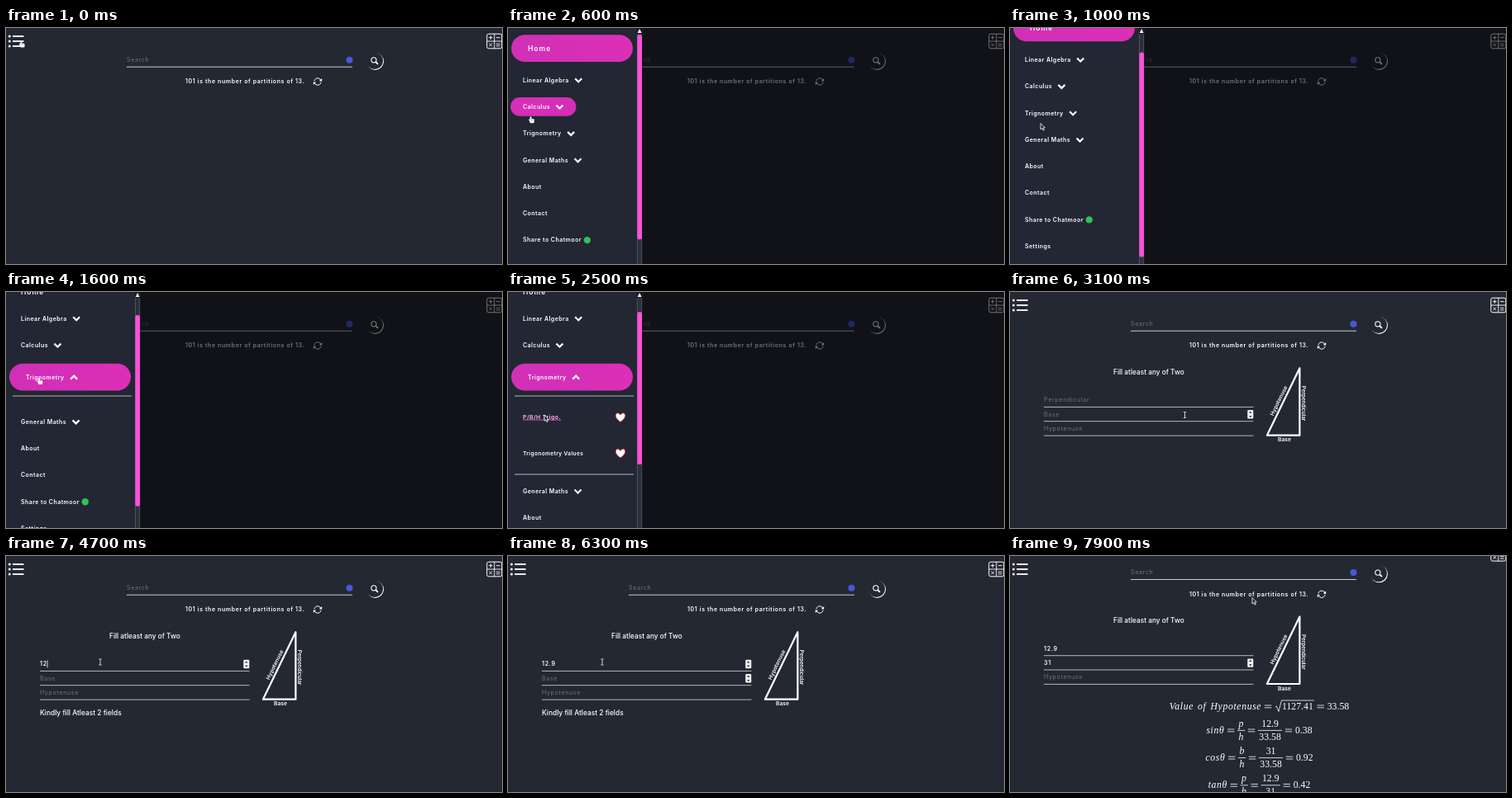
Write an HTML page with a canvas that moves like this. It is 600 by 286 pixels and loops after 8 s.

```html
<!DOCTYPE html>
<html lang="en">
<head>
<meta charset="utf-8">
<title>Maths helper</title>
<style>
  html, body { margin: 0; width: 100%; height: 100%; overflow: hidden; background: #232833; }
  canvas { display: block; width: 600px; height: 286px; }
</style>
</head>
<body>
<canvas id="stage" width="600" height="286"></canvas>
<script>
const ctx = document.getElementById('stage').getContext('2d');
const W = 600, H = 286, LOOP = 8000, STEP = 100;
const BG = '#232833', WHITE = '#fff', HINT = '#70747c', RULE = '#c6c9ce', PINK = '#d62eb7';
const SANS = 'Inter, sans-serif', SERIF = '"Liberation Serif", serif';

// ---------- helpers ----------
const ramp = (t, a, b) => {
  const k = Math.min(1, Math.max(0, (t - a) / (b - a)));
  return k * k * (3 - 2 * k);
};

function along(t, keys) {
  const i = keys.findIndex(k => k[0] > t);
  if (i < 0) return keys[keys.length - 1].slice(1);
  const [t0, x0, y0] = keys[i - 1], [t1, x1, y1] = keys[i];
  const k = ramp(t, t0, t1);
  return [x0 + (x1 - x0) * k, y0 + (y1 - y0) * k];
}

function setFont(size, spacing = 0, weight = 400, family = SANS, style = '') {
  ctx.font = `${style} ${weight} ${size}px ${family}`;
  ctx.letterSpacing = spacing + 'px';
  ctx.wordSpacing = '0px';
}

// Writes text centred vertically on y and returns its right edge.
function label(text, x, y, size = 7, spacing = 0.6, color = WHITE, weight = 600) {
  setFont(size, spacing, weight);
  ctx.fillStyle = color;
  ctx.fillText(text, x, y + size * 0.36);
  return x + ctx.measureText(text).width;
}

function line(points, width = 1, color = WHITE, close = false) {
  ctx.beginPath();
  points.forEach(([x, y]) => ctx.lineTo(x, y));
  if (close) ctx.closePath();
  ctx.lineWidth = width;
  ctx.strokeStyle = color;
  ctx.stroke();
}

function fillPoly(points, color) {
  ctx.beginPath();
  points.forEach(([x, y]) => ctx.lineTo(x, y));
  ctx.closePath();
  ctx.fillStyle = color;
  ctx.fill();
}

function disc(x, y, r, color) {
  ctx.beginPath();
  ctx.arc(x, y, r, 0, 7);
  ctx.fillStyle = color;
  ctx.fill();
}

function box(x, y, w, h, r, color) {
  ctx.beginPath();
  ctx.roundRect(x, y, w, h, r);
  ctx.fillStyle = color;
  ctx.fill();
}

function at(x, y, angle, draw) {
  ctx.save();
  ctx.translate(x, y);
  ctx.rotate(angle);
  draw();
  ctx.restore();
}

// ---------- header ----------
function menuIcon() {
  for (const y of [10, 16, 22]) {
    disc(4.3, y, 1.5, WHITE);
    line([[8, y], [21.5, y]], 1.8);
  }
}

function calculatorIcon() {
  ctx.beginPath();
  ctx.roundRect(581.8, 7.2, 18, 17.6, 2);
  ctx.lineWidth = 1;
  ctx.strokeStyle = WHITE;
  ctx.stroke();
  line([[590.8, 7], [590.8, 25]], 0.9);
  line([[582, 16], [600, 16]], 0.9);
  line([[584, 11.6], [588.6, 11.6]], 0.9);
  line([[586.3, 9.3], [586.3, 13.9]], 0.9);
  line([[593, 11.6], [597.6, 11.6]], 0.9);
  line([[584.5, 18.6], [588.1, 22.2]], 0.9);
  line([[588.1, 18.6], [584.5, 22.2]], 0.9);
  line([[593, 19.4], [597.6, 19.4]], 0.9);
  line([[593, 21.8], [597.6, 21.8]], 0.9);
}

function refreshIcon() {
  for (const turn of [0, Math.PI]) at(377, 65, turn, () => {
    ctx.beginPath();
    ctx.arc(0, 0, 4.2, Math.PI * 1.05, Math.PI * 1.88);
    ctx.lineWidth = 1;
    ctx.strokeStyle = WHITE;
    ctx.stroke();
    fillPoly([[5.2, -4], [5.2, -0.4], [1.8, -0.8]], WHITE);
  });
}

function header() {
  label('Search', 146, 38.5, 7, 0.7, HINT, 400);
  line([[146, 47.2], [419, 47.2]], 0.9, '#dfe1e4');
  disc(415.5, 38.8, 4, '#4a56d8');
  disc(446.6, 40.5, 10.4, WHITE);
  disc(445.8, 39.7, 10.3, BG);
  ctx.beginPath();
  ctx.arc(444.9, 38.8, 3.1, 0, 7);
  ctx.lineWidth = 1.1;
  ctx.strokeStyle = WHITE;
  ctx.stroke();
  line([[447.2, 41.1], [450, 43.9]], 1.8);
  label('101 is the number of partitions of 13.', 217, 64.8, 7, 0.6);
  refreshIcon();
  calculatorIcon();
}

// ---------- triangle form ----------
function spinner(y) {
  box(287.3, y - 5, 7, 10.4, 1, '#f4f4f4');
  fillPoly([[289, y - 1.4], [290.8, y - 3.6], [292.6, y - 1.4]], '#333');
  fillPoly([[289, y + 1.8], [290.8, y + 4], [292.6, y + 1.8]], '#333');
}

function field(hint, value, y, caret, spin) {
  const end = label(value || hint, 41, y, 7, 0.7, value ? WHITE : HINT, value ? 600 : 400);
  line([[41, y + 8.6], [294.5, y + 8.6]], 0.9, RULE);
  if (caret) {
    const x = value ? end + 0.3 : 41.5;
    line([[x, y - 4.5], [x, y + 4.5]], 0.8);
  }
  if (spin) spinner(y);
}

function triangle() {
  ctx.lineJoin = 'round';
  line([[350.4, 92.2], [350.4, 173.7], [310.9, 173.7]], 2.2, WHITE, true);
  ctx.lineJoin = 'miter';
  ctx.textAlign = 'center';
  label('Base', 332, 179, 6.7, 0);
  at(355, 135, Math.PI / 2, () => label('Perpendicular', 0, 0, 6.3, 0));
  at(325, 131.7, -1.12, () => label('Hypotenuse', 0, 0, 6.7, 0));
  ctx.textAlign = 'left';
}

// ---------- formulas ----------
const MATH = 11.8;
const mathFont = italic => {
  setFont(MATH, italic ? 0.6 : 0, 400, SERIF, italic ? 'italic' : '');
  if (italic) ctx.wordSpacing = '1.5px';
};

function run(text, italic = false) {
  mathFont(italic);
  return {
    w: ctx.measureText(text).width,
    draw(x, y) {
      mathFont(italic);
      ctx.fillStyle = WHITE;
      ctx.fillText(text, x, y + 3.8);
    }
  };
}

const equals = () => ({
  w: 15.8,
  draw(x, y) {
    line([[x + 3.7, y - 1], [x + 12.1, y - 1]], 0.8);
    line([[x + 3.7, y + 1.8], [x + 12.1, y + 1.8]], 0.8);
  }
});

function fraction(top, bottom, italic) {
  const a = run(top, italic), b = run(bottom, italic), w = Math.max(a.w, b.w) + 2.6;
  return {
    w,
    draw(x, y) {
      a.draw(x + (w - a.w) / 2, y - 8);
      b.draw(x + (w - b.w) / 2, y + 7.8);
      line([[x, y + 0.4], [x + w, y + 0.4]], 0.8);
    }
  };
}

function root(text) {
  const body = run(text);
  return {
    w: body.w + 10,
    draw(x, y) {
      body.draw(x + 9, y);
      line([[x + 1, y + 1], [x + 2.4, y], [x + 5, y + 6.5], [x + 8.5, y - 7], [x + 10 + body.w, y - 7]], 0.8);
    }
  };
}

function formula(y, parts) {
  let x = 301.5 - parts.reduce((sum, p) => sum + p.w, 0) / 2;
  for (const p of parts) {
    p.draw(x, y);
    x += p.w;
  }
}

function results(p, b) {
  const square = p * p + b * b, h = Math.sqrt(square), two = v => v.toFixed(2);
  formula(200.7, [run('Value of Hypotenuse', true), equals(), root(two(square)), equals(), run(two(h))]);
  const ratios = [
    ['sin', 'p', 'h', p, two(h), p / h],
    ['cos', 'b', 'h', b, two(h), b / h],
    ['tan', 'p', 'b', p, b, p / b]
  ];
  ratios.forEach(([name, n, d, top, bottom, value], i) => formula(229.7 + 33.2 * i, [
    run(name + 'θ', true), equals(), fraction(n, d, true), equals(),
    fraction(String(top), String(bottom)), equals(), run(two(value))
  ]));
}

function form(t, [cx, cy]) {
  label('Fill atleast any of Two', 125, 97, 8.3, 0, WHITE, 500);
  const typed = t < 4500 ? 0 : t < 4700 ? 1 : t < 5000 ? 2 : t < 5400 ? 3 : 4;
  const height = '12.9'.slice(0, typed);
  const base = t < 6900 ? '' : t < 7100 ? '3' : '31';
  const over = y => cx > 41 && cx < 295 && Math.abs(cy - y) < 8.5;
  const onFirst = t >= 3500 && t < 5700, onSecond = t >= 5700;
  field('Perpendicular', height, 130.8, onFirst && !(t >= 4200 && t < 4500), onFirst || over(130.8));
  field('Base', base, 148.1, onSecond && t < 7400 && !(t >= 6300 && t < 6900), onSecond || over(148.1));
  field('Hypotenuse', '', 165.5, false, over(165.5));
  triangle();
  if (base) results(12.9, Number(base));
  else if (typed) label('Kindly fill Atleast 2 fields', 41, 190, 8.4, 0, WHITE, 500);
}

// ---------- side menu ----------
const MENU = ['Home', 'Linear Algebra', 'Calculus', 'Trignometry', 'General Maths',
  'About', 'Contact', 'Share to Chatmoor', 'Settings'];
const SUBMENU = 99.7;

function menuLayout(t) {
  const active = t < 1600 ? 0 : 3;
  const open = ramp(t, 1500, 1900);
  const scroll = 24.7 * ramp(t, 700, 1000);
  let y = 24.5 - scroll;
  const items = MENU.map((text, i) => {
    if (i) y += 32.3 + (i === active || i - 1 === active ? 6.3 : 0);
    if (i === 4) y += SUBMENU * open;
    return { text, y, active: i === active, folds: i > 0 && i < 5 };
  });
  return { items, open, scroll, height: y + scroll + 22 };
}

function chevron(x, y, up) {
  const d = up ? -2.2 : 2.2;
  line([[x - 4, y - d], [x, y + d * 0.8], [x + 4, y - d]], 2.2);
}

function heart(x, y) {
  ctx.beginPath();
  ctx.moveTo(x, y + 5.5);
  ctx.bezierCurveTo(x - 11, y - 2, x - 3.5, y - 9, x, y - 3);
  ctx.bezierCurveTo(x + 3.5, y - 9, x + 11, y - 2, x, y + 5.5);
  ctx.fillStyle = WHITE;
  ctx.fill();
  ctx.lineWidth = 0.9;
  ctx.strokeStyle = '#e0283c';
  ctx.stroke();
}

function submenu(y, open, hover) {
  ctx.save();
  ctx.beginPath();
  ctx.rect(0, y + 18, 156, 103 * open);
  ctx.clip();
  line([[8, y + 23], [152, y + 23]], 0.9, RULE);
  const end = label('P/B/H Trigo.', 18, y + 48.7, 6.8, 0.5, hover ? '#ffc4ee' : WHITE);
  if (hover) line([[18, y + 52], [end, y + 52]], 1, '#ee45c8');
  label('Trigonometry Values', 18, y + 92.3, 6.6, 0.35);
  heart(136, y + 49);
  heart(136, y + 92.5);
  line([[8, y + 118], [152, y + 118]], 0.9, RULE);
  ctx.restore();
}

function scrollbar({ scroll, height }) {
  box(156, 0, 6.2, H, 0, '#4b505b');
  box(157, 8, 4.2, H - 8, 0, '#2a2f3a');
  box(156, 0, 6.2, 7.5, 0, '#15181f');
  fillPoly([[156.6, 6], [159.1, 1], [161.6, 6]], WHITE);
  box(156.4, 8 + 270 * scroll / height, 5.6, 270 * H / height, 2.5, '#ff50d9');
}

function sideMenu(layout, t, hovered) {
  box(0, 0, 162, H, 0, '#222733');
  const glow = ctx.createLinearGradient(4, 0, 151, 0);
  glow.addColorStop(0, '#d030b6');
  glow.addColorStop(1, '#dc2fb7');
  for (const item of layout.items) {
    const { text, y, active, folds } = item;
    const big = text === 'Home';
    const x = active ? 24 : 18;
    const size = big ? 8.5 : 7, spacing = big ? 1 : 0.45;
    if (active) box(4, y - 16.3, 147, 32.8, 16.4, glow);
    else if (item === hovered) {
      setFont(size, spacing, 600);
      box(3, y - 11.3, 28.5 + ctx.measureText(text).width + (folds ? 18 : 0), 22.6, 11.3, PINK);
    }
    const end = label(text, x, y, size, spacing);
    if (folds) chevron(end + 11.5, y + 0.4, active);
    if (text.startsWith('Share')) disc(95.8, y + 0.2, 4.2, '#2fc351');
  }
  if (layout.open > 0) submenu(layout.items[3].y, layout.open, t >= 2000);
  scrollbar(layout);
}

// ---------- pointer ----------
const PATH = [
  [0, 18.3, 15.5], [300, 18.3, 15.5], [600, 27.5, 107.2], [800, 28, 109], [1000, 37, 115.5],
  [1200, 38, 113], [1400, 40, 104], [1700, 40, 104], [2000, 56, 147], [2300, 44, 149],
  [2500, 44, 149], [3100, 211.5, 149], [3300, 116, 129], [3500, 114, 128.5],
  [7400, 114, 128.5], [7800, 293, 50.5]
];

const pointers = {
  arrow() {
    const shape = [[0, 0], [0, 7.4], [1.8, 5.9], [3, 8.6], [4.3, 8], [3.1, 5.4], [5.3, 5.3]];
    fillPoly(shape, '#20242c');
    line(shape, 0.8, WHITE, true);
  },
  hand() {
    box(-0.9, 0, 1.8, 6, 0.9, WHITE);
    box(-1, 2.9, 5.2, 5.2, 1.4, WHITE);
    fillPoly([[-2.7, 3.8], [-1.8, 3.4], [0, 5.2], [0, 8]], WHITE);
    line([[1.2, 3.2], [1.2, 5]], 0.4, '#333');
    line([[2.7, 3.4], [2.7, 5]], 0.4, '#333');
  },
  beam() {
    line([[0, -3.4], [0, 3.4]], 0.9, '#e4e4e4');
    line([[-1.7, -3.5], [1.7, -3.5]], 0.8, '#e4e4e4');
    line([[-1.7, 3.5], [1.7, 3.5]], 0.8, '#e4e4e4');
  }
};

// ---------- scene ----------
function render(t) {
  const cursor = along(t, PATH), [cx, cy] = cursor;
  const shown = ramp(t, 200, 550) * (1 - ramp(t, 2500, 2900));
  const pageScroll = 18.7 * ramp(t, 7400, 7900);
  const hasForm = t >= 2700;
  const layout = menuLayout(t);
  const hovered = shown > 0.9 && t < 1900 && layout.items.find(i => Math.abs(i.y - cy) < 12.5);

  box(0, 0, W, H, 0, BG);
  ctx.save();
  ctx.translate(0, -pageScroll);
  header();
  if (hasForm) form(t, [cx, cy + pageScroll]);
  ctx.restore();
  menuIcon();

  if (shown > 0) {
    box(0, 0, W, H, 0, `rgba(0,0,0,${0.55 * shown})`);
    at(-162 * (1 - shown), 0, 0, () => sideMenu(layout, t, hovered));
  }

  const inForm = hasForm && shown < 0.1 && cx > 41 && cx < 294 && cy > 122 && cy < 175;
  const kind = inForm ? 'beam' : hovered || t < 400 ? 'hand' : 'arrow';
  at(cx, cy, 0, pointers[kind]);
}

function tick() {
  const t = performance.now() % LOOP;
  render(Math.floor(t / STEP) * STEP);
  requestAnimationFrame(tick);
}
tick();
</script>
</body>
</html>
```
